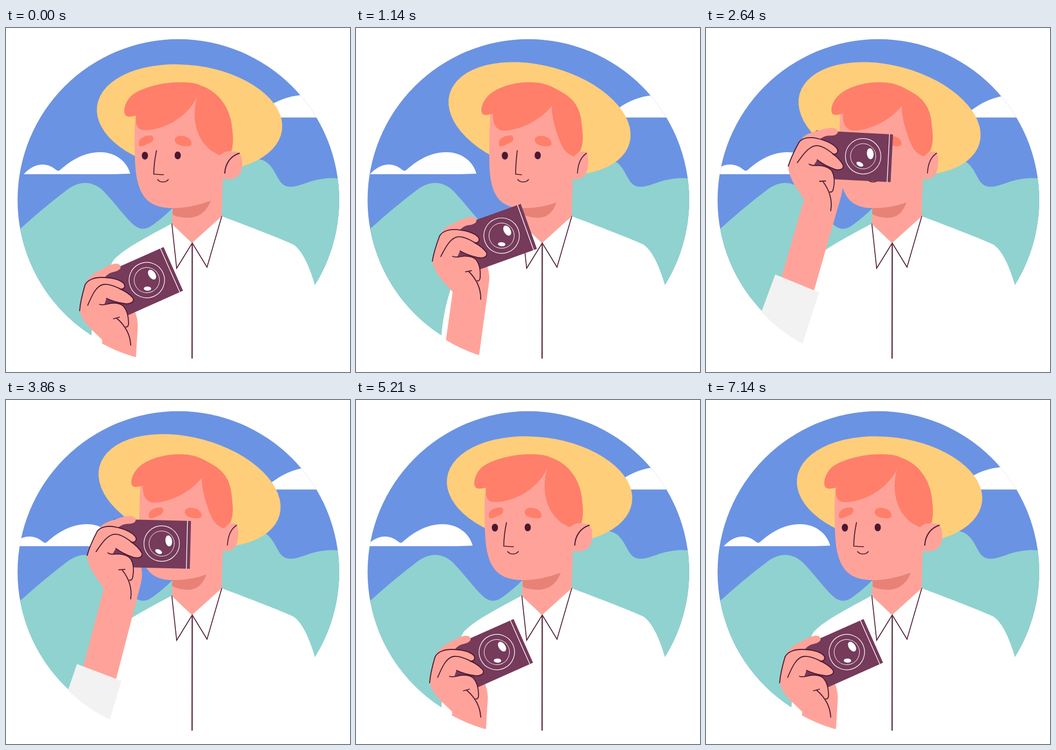
Animation of 640x640 px, one loop 7.21 s. Source, as an HTML page with a canvas:

```html
<!DOCTYPE html>
<html lang="en">
<head>
<meta charset="utf-8">
<title>Traveller with a camera</title>
<style>
html, body { margin: 0; width: 100%; height: 100%; overflow: hidden; background: #fff; }
canvas { display: block; width: 640px; height: 640px; }
</style>
</head>
<body>
<canvas id="stage" width="640" height="640"></canvas>
<script>
const ctx = document.getElementById('stage').getContext('2d');
const LOOP = 7210;
const SKY = '#6b93e3', HILL = '#90d2cf', STRAW = '#ffce7b', HAIR = '#ff7f6a', SKIN = '#ffa39a',
      SHADE = '#e88276', INK = '#4b1832', BODY = '#763a5a', CUFF = '#f2f2f2', WHITE = '#fff';
const RAD = Math.PI / 180;

const clamp = x => Math.min(1, Math.max(0, x));
const span = (t, a, b) => clamp((t - a) / (b - a));
const ease = u => (1 - Math.cos(Math.PI * u)) / 2;
const mix = (a, b, k) => a + (b - a) * k;
// Rises over [a, b], rests, falls back over [c, d].
const swell = (t, a, b, c, d) => ease(span(t, a, b)) - ease(span(t, c, d));

const fill = (d, color) => { ctx.fillStyle = color; ctx.fill(new Path2D(d)); };
const line = (d, width = 1.8, color = INK) => {
  ctx.strokeStyle = color;
  ctx.lineWidth = width;
  ctx.stroke(new Path2D(d));
};
const oval = (x, y, rx, ry, color, angle = 0) => {
  ctx.beginPath();
  ctx.ellipse(x, y, rx, ry, angle * RAD, 0, 7);
  ctx.fillStyle = color;
  ctx.fill();
};
const ring = (r, width) => {
  ctx.beginPath();
  ctx.arc(0, 0, r, 0, 7);
  ctx.strokeStyle = WHITE;
  ctx.lineWidth = width;
  ctx.stroke();
};
const group = draw => { ctx.save(); draw(); ctx.restore(); };
const spin = (x, y, angle) => {
  ctx.translate(x, y);
  ctx.rotate(angle * RAD);
  ctx.translate(-x, -y);
};
// Blends two paths that share the same commands.
const morph = (a, b, k) => {
  const to = b.match(/[\d.]+/g);
  let i = 0;
  return a.replace(/[\d.]+/g, n => mix(+n, +to[i++], k).toFixed(2));
};

const FACE = [
  'M242 160C238 185 239 215 240 245C242 310 262 335 310 335C340 335 365 327 381 321L404 285L402 230L356 118Z',
  'M250 160C248 190 248 215 248 250C249 312 268 335 310 335C338 335 360 330 373 324L404 285L406 235L366 135Z'];
const CHIN = [
  'M310 328L381 321C372 345 355 354 335 353C322 352 314 350 310 347Z',
  'M310 328L373 324C365 347 352 354 335 353C322 352 314 349 309 346Z'];
const LOCKS = [
  'M362 107C352 101 335 101 318 101C286 102 250 112 233 126C220 140 217 157 223 163C229 167 236 164 242 163C240 178 244 189 256 190C286 191 335 172 356 127C347 155 350 188 365 210C375 226 390 234 399 237C405 230 412 229 419 230C423 218 423 202 421 190C419 150 396 118 362 107Z',
  'M375 115C352 101 335 101 318 101C286 102 258 113 245 127C233 140 230 157 237 161C243 163 249 160 255 160C253 176 261 191 275 191C300 191 342 174 364 145C364 168 373 195 381 215C387 229 396 236 406 239C411 236 413 231 417 229C422 218 423 205 421 190C419 155 412 133 375 115Z'];
const EAR = [
  'M398 237C405 229 420 228 432 231C441 238 441 255 437 268C432 280 415 285 403 279L400 240Z',
  'M406 239C411 231 422 228 429 231C433 240 433 255 429 268C424 280 412 284 403 279L404 245Z'];
const EAR_FOLD = ['M407 270C408 252 418 238 434 233', 'M412 270C413 252 418 240 429 233'];
const NOSE = ['M280 228C277 242 275 255 275 272L293 273', 'M300 228C298 245 297 258 297 272L308 273'];
const MOUTH = ['M282 282C287 288 297 288 302 282', 'M301 282C306 288 316 288 321 282'];

function scenery(drift) {
  ctx.beginPath();
  ctx.arc(320.7, 320, 299.2, 0, 7);
  ctx.clip();
  ctx.fillStyle = SKY;
  ctx.fillRect(0, 0, 640, 640);
  group(() => {
    ctx.translate(17 * drift, 0);
    fill('M456 166.5C481 156 501 124 566 124L640 124L640 166.5Z', WHITE);
  });
  group(() => {
    ctx.translate(-25 * drift, 0);
    fill('M33 272C42 262 55 253 70 254C84 255 90 262 95 265Q98 267 102 263C115 252 140 231 175 231C205 231 226 250 231 271L200 272Z', WHITE);
  });
  fill('M26 374Q70 334 115 300C137 284 160 284 180 302C203 326 220 350 235 364C250 378 262 375 275 365Q294 351 310 335L400 260L450 238L478 246C497 254 502 276 512 288C525 302 545 293 565 286C585 280 602 278 620 280L640 640L0 640Z', HILL);
}

function head(k) {
  const part = (pair, color) => fill(morph(pair[0], pair[1], k), color);
  const trace = (pair, width) => line(morph(pair[0], pair[1], k), width);
  fill('M310.500 325L308.500 364L346 400L401.500 350Q402 300 404 275L404 230Z', SKIN);
  part(CHIN, SHADE);
  part(FACE, SKIN);
  part(LOCKS, HAIR);
  part(EAR, SKIN);
  trace(EAR_FOLD, mix(2, 1.6, k));
  group(() => {
    ctx.translate(18.6 * k, 0);
    fill('M247 213C249 203 262 199 271 200C276 203 275 211 268 214C262 216 255 221 249 220C247 219 247 216 247 213Z', HAIR);
    fill('M314 207C316 200 325 199 334 202C343 205 346 212 345 217C343 221 333 221 323 218C316 216 313 211 314 207Z', HAIR);
    oval(258.4, 237.5, 5.8, 7.3, INK);
    oval(319.5, 237, 5.8, 7.3, INK);
  });
  trace(NOSE, 1.7);
  trace(MOUTH, 1.7);
}

function shirt() {
  fill('M308 364C270 385 222 408 200 432C178 470 163 520 159 572L159 640L640 640L575 479C565 445 552 415 535 403C500 387 440 365 401 350L346 400Z', WHITE);
  ctx.lineJoin = 'miter';
  line('M308.500 364L317.500 447L346.500 400L374 445L401.500 350', 1.6);
  ctx.lineJoin = 'round';
  line('M346.500 400L346.200 614', 2.4, '#5f3040');
}

function camera() {
  ctx.translate(262, 469);
  ctx.rotate(-24 * RAD);
  ctx.fillStyle = BODY;
  ctx.fillRect(-90, -43.5, 143.500, 89);
  line('M47 -43.5L47 45.5', 1.3, WHITE);
  ring(33, 1.2);
  ring(23.5, 0.9);
  oval(13, -5.3, 6.2, 10.2, WHITE, -10);
  oval(-5.3, 15, 6.9, 3.8, WHITE, 25);
}

function arm(lift, tilt) {
  ctx.beginPath();
  ctx.ellipse(320.7, 320, 299.2, 303.3, 0, 0, 7);
  ctx.clip();
  ctx.translate(0, -lift);
  spin(232, 590, lift * 0.05);
  fill('M179 580L169 735L233.500 746L245 560C246 545 243 534 238 524L200 520Z', SKIN);
  fill('M157 728L244 743L232 865L138 865Z', CUFF);
  group(() => { spin(230, 501, tilt); camera(); });
  // Index finger, then the front of the hand.
  fill('M151 471C153 462 165 456 185 445C196 439 207 436 212 441C216 447 210 452 200 454C193 455 187 460 183 465L165 478Z', SKIN);
  fill('M137 526C138 512 142 495 147 478C152 468 165 464 178 464C196 464 212 468 219 475C224 482 218 487 210 486C222 490 232 496 237 503C239 509 232 514 222 513C208 511 197 508 187 503L183 514C194 511 208 510 217 516C227 524 229 545 226 556L215 590L179 580C163 564 143 549 137 526Z', SKIN);
  line('M137 526C138 512 142 495 147 478C152 468 165 464 178 464C196 464 212 468 219 475C223 481 220 486 213 486');
  line('M152 516C160 497 168 479 182 477C197 475 227 491 236 502C240 509 232 514 222 513C208 511 197 508 187 503');
  line('M174 514C180 517 188 513 196 512C206 511 213 513 218 517C226 526 228 540 228 549C228 554 226 557 223 556');
  line('M200 541L211 538M206 540C220 552 231 568 232 590');
}

function draw(now) {
  const t = now % LOOP;
  const turn = swell(t, 0, 800, 4110, 4910);
  const drift = swell(t, 0, 3200, 3500, LOOP);
  const rise = 1 - (1 - span(t, 840, 2440)) ** 2;
  const drop = span(t, 3155, 5190) ** 2;
  const tilt = 14.4 * swell(t, 1350, 2440, 3860, 5190);

  ctx.fillStyle = WHITE;
  ctx.fillRect(0, 0, 640, 640);
  ctx.lineCap = ctx.lineJoin = 'round';
  group(() => scenery(drift));
  oval(341.5, 167.5 + turn, 173.5, 98.2, STRAW, mix(7.4, 15.2, turn));
  shirt();
  head(turn);
  group(() => arm(250 * (rise - drop), tilt));
}

const start = performance.now();
(function tick() {
  draw(performance.now() - start);
  requestAnimationFrame(tick);
})();
</script>
</body>
</html>
```
